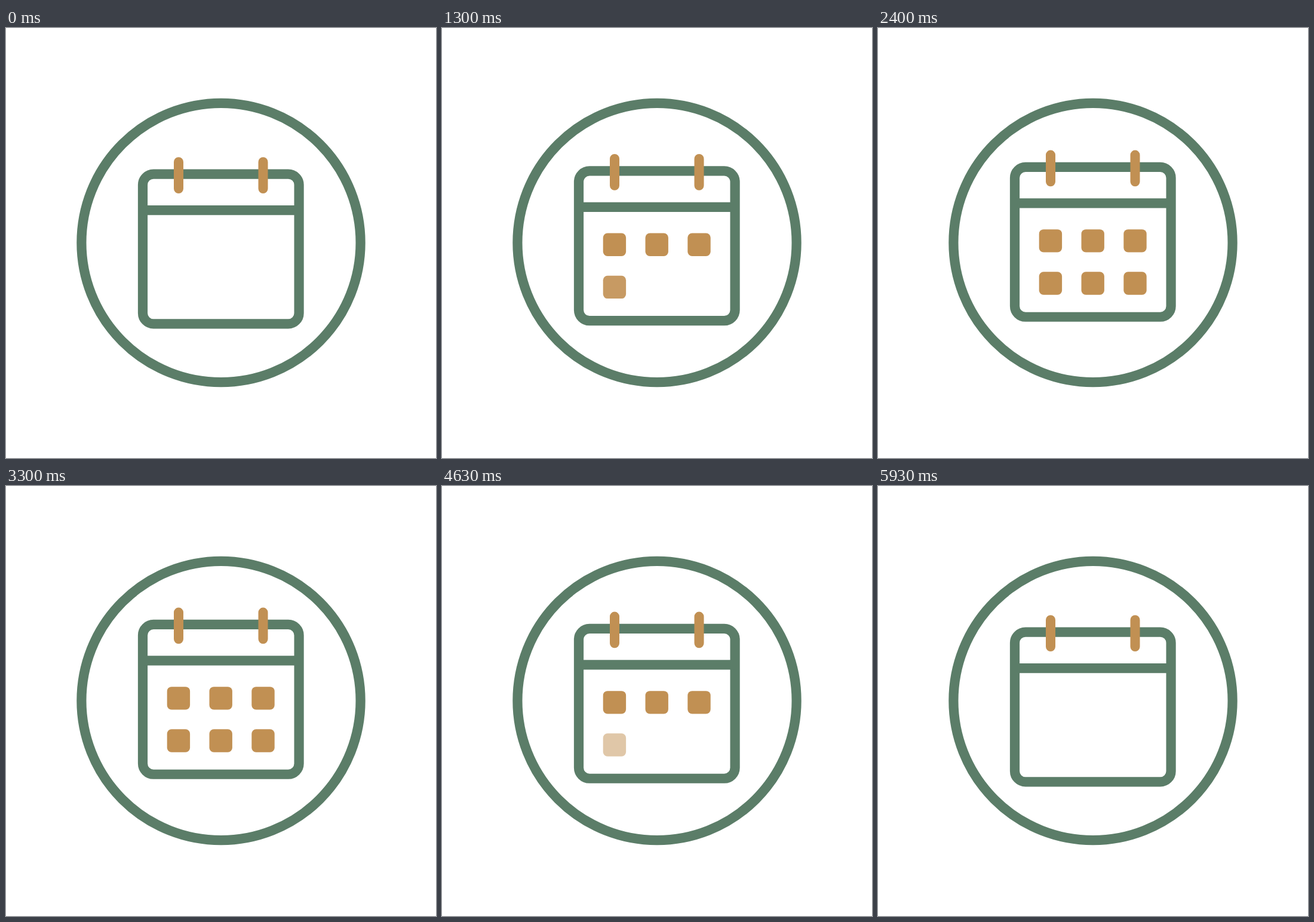
These frames come from a looping animation (720x720 px, 6010 ms). An HTML page:

```html
<!DOCTYPE html>
<html lang="en">
<head>
<meta charset="utf-8">
<title>Calendar</title>
<style>
  html, body { margin: 0; width: 100%; height: 100%; overflow: hidden; background: #fff; }
  svg { display: block; width: 100%; height: 100%; }
  .line { fill: none; stroke: #5b7d68; stroke-width: 16.2; }
  .peg { fill: none; stroke: #c19053; stroke-width: 16; stroke-linecap: round; }
  .day { fill: #c19053; }
</style>
</head>
<body>
<svg viewBox="0 0 720 720">
  <circle class="line" cx="360" cy="359.5" r="233.6"/>
  <g id="calendar">
    <rect class="line" x="229" y="244.6" width="261.6" height="250.8" rx="18"/>
    <path class="line" d="M229 305.1H490.6"/>
    <path class="peg" d="M289 224.2V269M430.5 224.2V269"/>
    <g id="days"></g>
  </g>
</svg>
<script>
  const LOOP = 6010, HALF = 3000, LIFT = 13;
  const FADE = 1000 / 3, FADED_OUT = 5800;
  const calendar = document.getElementById('calendar');
  const group = document.getElementById('days');

  const days = Array.from({ length: 6 }, (_, i) => {
    const day = document.createElementNS('http://www.w3.org/2000/svg', 'rect');
    const attrs = {
      class: 'day', x: 269.7 + (i % 3) * 70.8, y: 348.8 + Math.floor(i / 3) * 71.1,
      width: 38.4, height: 38.4, rx: 7.5
    };
    for (const name in attrs) day.setAttribute(name, attrs[name]);
    return group.appendChild(day);
  });

  const clamp = v => Math.min(1, Math.max(0, v));
  const ease = u => u * u * (3 - 2 * u);

  // The picture advances twice per 100 ms, in uneven steps of 30 and 70 ms.
  function stepTime(t) {
    const held = Math.min(t, 5930);
    const base = Math.floor(held / 100) * 100;
    return base + (held - base >= 30 ? 100 / 3 : 0);
  }

  function draw(now) {
    const t = stepTime(now % LOOP);
    const rise = ease(clamp(1 - Math.abs(t - HALF) / HALF));
    calendar.setAttribute('transform', `translate(0 ${-LIFT * rise})`);
    days.forEach((day, i) => {
      const shown = Math.min(t, FADED_OUT - t) / FADE - i;
      day.setAttribute('opacity', clamp(shown));
    });
    requestAnimationFrame(draw);
  }
  draw(performance.now());
</script>
</body>
</html>
```
